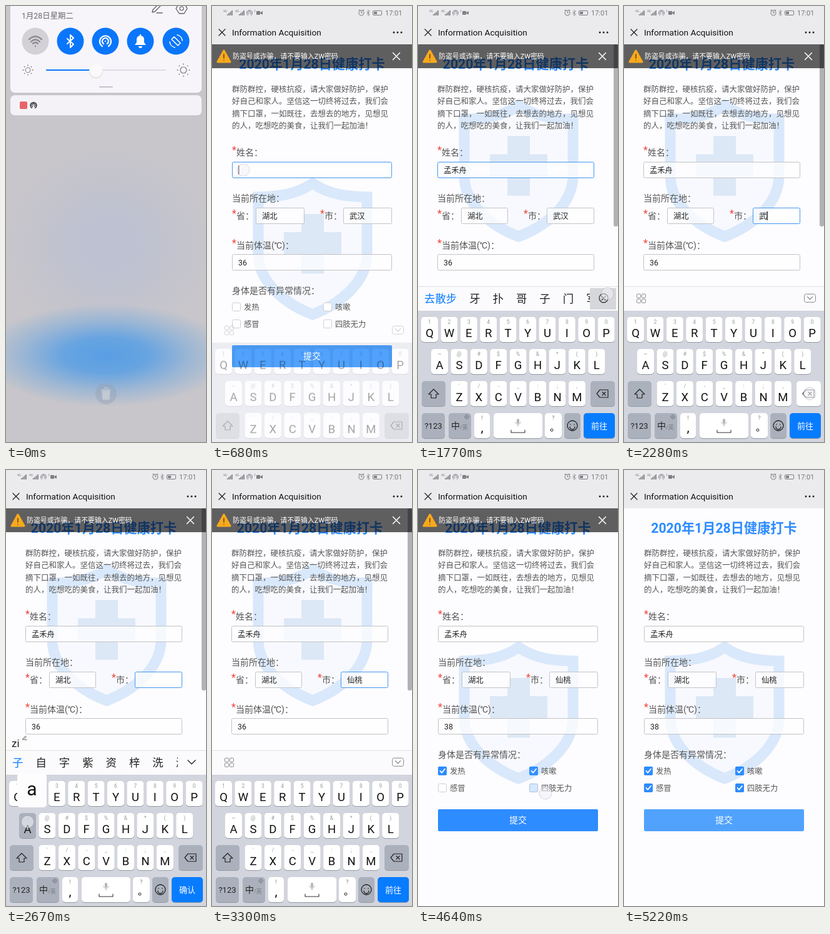
Write an HTML page with a canvas that moves like this. It is 320 px wide and 694 px high and loops after 5350 ms.

```html
<!DOCTYPE html>
<html lang="zh-CN">
<head>
<meta charset="utf-8">
<style>
html, body { margin: 0; width: 100%; height: 100%; overflow: hidden; background: #fdfcfe; }
canvas { display: block; width: 320px; height: 694px; }
</style>
</head>
<body>
<canvas id="stage" width="320" height="694"></canvas>
<script>
const stage = document.getElementById('stage').getContext('2d');
const layer = stage.canvas.cloneNode().getContext('2d');
let c = stage;
const LOOP = 5350, BLUE = '#2d8cff', KEYBLUE = '#087cff', TAU = Math.PI * 2;
const FONT = 'Roboto, "Noto Sans CJK SC", "Noto Sans CJK", sans-serif';
const NAME = '孟禾舟';

const ramp = (t, a, b) => Math.min(1, Math.max(0, (t - a) / (b - a)));
const ease = p => p * p * (3 - 2 * p);
const within = (t, a, b) => t >= a && t < b;

// y is the vertical middle of the text
function text(s, x, y, size, color = '#555', align = 'left', weight = 400) {
  c.font = `${weight} ${size}px ${FONT}`;
  c.textAlign = align;
  c.fillStyle = color;
  c.fillText(s, x, y + size * 0.37);
}
function widthOf(s, size) {
  c.font = `${size}px ${FONT}`;
  return c.measureText(s).width;
}
function box(x, y, w, h, r, fill, stroke) {
  c.beginPath();
  c.roundRect(x, y, w, h, r);
  if (fill) { c.fillStyle = fill; c.fill(); }
  if (stroke) { c.strokeStyle = stroke; c.lineWidth = 1; c.stroke(); }
}
function disc(x, y, r, fill) {
  c.beginPath();
  c.arc(x, y, r, 0, TAU);
  c.fillStyle = fill;
  c.fill();
}
function icon(d, x, y, color, width = 1.2, scale = 1) {
  c.save();
  c.translate(x, y);
  c.scale(scale, scale);
  c.lineCap = c.lineJoin = 'round';
  c.lineWidth = width;
  c.strokeStyle = c.fillStyle = color;
  const p = new Path2D(d);
  if (width) c.stroke(p); else c.fill(p);
  c.restore();
}
function faded(alpha, draw) {
  if (alpha <= 0) return;
  c.save();
  c.globalAlpha *= alpha;
  draw();
  c.restore();
}

const CROSS = 'M-5-5L5 5M5-5L-5 5';
const BT = 'M-5-4L5 5L0 10V-10L5-5L-5 4';
const HOTSPOT = 'M-5 8A9 9 0 1 1 5 8M-3 4A5 5 0 1 1 3 4M0 0V.1';
const PENCIL = 'M-7 5L-6 1L4-9L7-6L-3 4ZM0 6H9';
const RING = 'M-5 0A5 5 0 1 0 5 0A5 5 0 1 0-5 0';

/* ---------- page ---------- */
function statusBar() {
  const g = '#808085';
  box(0, 0, 320, 61, 0, '#ebeaed');
  for (const x of [18, 37]) {
    text('4G', x, 8, 5, g);
    for (let i = 0; i < 4; i++) box(x + 6 + i * 2.4, 13 - i * 2, 1.7, 2 + i * 2, 0, g);
  }
  icon(HOTSPOT, 60, 11, g, 2, 0.5);
  text('1', 67, 8, 6, g);
  box(71, 8, 6, 6, 1, g);
  icon('M5 0L10-3V3Z', 71, 11, g, 0);
  icon(RING + 'M0-3V0H2M-5-5L-3-6M5-5L3-6', 239, 11, g, 1.3, 0.8);
  icon(BT, 250, 11, g, 1.8, 0.45);
  box(257.5, 7.5, 14, 7, 1.5, null, g);
  box(259, 9, 5, 4, 0, g);
  text('17:01', 277, 11, 11, '#77777b');
  icon(CROSS, 16, 42, '#222', 1.3);
  text('Information Acquisition', 32, 42, 13.7, '#111');
  for (const x of [291, 297, 303]) disc(x, 42, 1.5, '#222');
}

function shield(dy) {
  c.save();
  c.translate(161, 386 + dy);
  c.lineJoin = 'miter';
  c.strokeStyle = '#d9e8fb';
  c.fillStyle = '#f8f9fe';
  c.lineWidth = 17;
  const rim = new Path2D('M0-104C-28-84-60-83-87-82V8C-87 56-40 90 0 105C40 90 87 56 87 8V-82C60-83 28-84 0-104Z');
  c.fill(rim);
  c.stroke(rim);
  c.fillStyle = '#dce8f6';
  c.fill(new Path2D('M-18-55H18V-26H46V10H18V40H-18V10H-46V-26H-18Z'));
  c.restore();
}

function field(x, y, w, value, focused, caret) {
  box(x + 0.5, y + 0.5, w - 1, 25, 2, 'rgba(255,255,255,.75)', focused ? '#4497ee' : '#c3c3c8');
  text(value, x + 10, y + 13, 12.3, '#222');
  if (focused && caret) box(x + 10 + widthOf(value, 12.3), y + 6, 1.5, 14, 0, '#222');
}
function required(label, x, y) {
  text('*', x, y - 4, 16, '#f0443c');
  text(label, x + 7, y, 14);
}
function check(label, x, y, amount) {
  box(x + 0.5, y - 6.5, 13, 13, 2, '#fff', '#cfcfd4');
  faded(amount, () => {
    box(x, y - 7, 14, 14, 2, BLUE);
    icon('M-3.5 0L-1 2.8L4-3', x + 7, y, '#fff', 1.8);
  });
  text(label, x + 19, y, 12.3);
}

const STORY = [
  '群防群控，硬核抗疫，请大家做好防护，保护',
  '好自己和家人。坚信这一切终将过去，我们会',
  '摘下口罩，一如既往，去想去的地方，见想见',
  '的人，吃想吃的美食，让我们一起加油！'
];
const CHECKS = [['发热', 32, 479, 4480], ['咳嗽', 178, 479, 4545], ['四肢无力', 178, 506, 4620], ['感冒', 32, 506, 4720]];

function page(t) {
  const small = within(t, 755, 4300);
  const x = small ? 31 : 32, w = small ? 251 : 256, mid = small ? 156.5 : 160;
  const caret = (t - 600) % 800 < 300;
  const focus = t < 630 ? '' : t < 2050 ? 'name' : t < 3400 ? 'city' : t < 4300 ? 'temp' : '';
  const city = t < 2210 ? '武汉' : t < 2300 ? '武' : t < 3190 ? '' : '仙桃';
  const temp = t < 3800 ? '36' : t < 4060 ? '3' : '38';

  box(0, 0, 320, 694, 0, '#fdfcfe');
  shield(small ? -124 : 0);
  text('2020年1月28日健康打卡', mid, 92, 21.2, BLUE, 'center', 700);
  STORY.forEach((s, i) => text(s, x, 132 + i * 19.6, 12.5));
  required('姓名：', x, 233);
  field(x, 248, w, t < 1620 ? '' : NAME, focus === 'name', caret);
  text('当前所在地：', x, 306, 14);
  required('省：', x, 334);
  field(x + 38, 321, small ? 75 : 78, '湖北');
  required('市：', small ? 169 : 173, 334);
  field(small ? 206 : 210, 321, small ? 76 : 78, city, focus === 'city', caret);
  required('当前体温(℃)：', x, 381);
  field(x, 395, w, temp, focus === 'temp', caret);
  if (within(t, 3450, 3800)) {
    disc(55, 429, 8.5, '#3e94ee');
    icon('M0-13L8-3H-8Z', 55, 429, '#3e94ee', 0);
  }
  text('身体是否有异常情况：', x, 453, 14);
  for (const [label, cx, cy, at] of CHECKS) check(label, cx, cy, ramp(t, at, at + 100));
  box(32, 540, 256, 35, 2, t > 4860 || t < 760 ? '#50a2fc' : BLUE);
  text('提交', 160, 557, 14, '#fff', 'center');
  if (small) box(313, 61, 7, 290, 3, '#b2b1b5');
  statusBar();
  faded(ramp(t, 615, 665) * (1 - ramp(t, 4870, 4950)), warning);
}

function warning() {
  box(0, 61, 320, 38, 0, 'rgba(0,0,0,.62)');
  icon('M0-9L10 9H-10Z', 19, 80, '#f9a91c', 3);
  icon('M0-9L10 9H-10Z', 19, 80, '#f9a91c', 0);
  icon('M0-3V3M0 6.5V6.6', 19, 80, '#5c4a22', 1.6);
  text('防盗号或诈骗，请不要输入ZW密码', 33, 80, 10.9, '#fff');
  icon(CROSS, 295, 80, '#fff', 1.3, 1.1);
}

/* ---------- keyboard ---------- */
const ROWS = [['QWERTYUIOP', '1234567890', 18.5, 495], ['ASDFGHJKL', '~@#$%&*()', 34.5, 546], ['ZXCVBNM', "'/-_:;,", 66, 597]];
const keys = {};
for (const [letters, hints, x, y] of ROWS)
  [...letters].forEach((k, i) => keys[k] = { x: x + i * 31.4, y, hint: hints[i] });

// each press: time, key label
const spell = (word, at, step) => [...word].map((ch, i) => [at + i * step, ch]);
const WORDS = [
  { keys: spell('menghezhou', 800, 74), end: 1620, result: NAME, first: '没吗们买每妈秘美' },
  { keys: spell('zi', 2440, 105).concat(spell('antao', 2645, 92)), end: 3190, result: '仙桃', first: '子自字紫资梓洗滋' }
];
const PRESSES = [...WORDS[0].keys, ...WORDS[1].keys, [4030, 'i']];
const TAPS = [
  [635, 50, 261], [1600, 30, 465], [1735, 303, 458], [2030, 240, 334], [2180, 297, 617], [2270, 297, 617],
  [3165, 28, 465], [3390, 60, 409], [3700, 297, 617], [4230, 297, 465],
  [4470, 40, 479], [4535, 186, 479], [4610, 204, 514], [4710, 40, 506], [4830, 165, 557]
];
for (const [at, k] of PRESSES) {
  const key = keys[k.toUpperCase()];
  TAPS.push([at, key.x, key.y + 14]);
}
const activeWord = t => WORDS.find(w => within(t, w.keys[0][0] + 40, w.end));

function cap(x, y, w, fill = '#fff') {
  box(x, y + 1, w, 40, 5, '#969aa4');
  box(x, y, w, 40, 5, fill);
}

function toolbar() {
  const g = '#8c8c92';
  for (const x of [20, 28])
    for (const y of [458, 466]) box(x + 0.5, y + 0.5, 6, 6, 1, null, g);
  box(288.5, 458.5, 18, 13, 3, null, g);
  icon('M-4-2L0 2L4-2', 297.5, 465, g);
}

function candidates(t) {
  const word = activeWord(t), size = 17.4;
  let list;
  if (word) {
    const typed = word.keys.filter(k => t >= k[0] + 40).map(k => k[1]).join('');
    const w = widthOf(typed, 17);
    list = [...word.first];
    if (typed.length === word.keys.length) list[0] = word.result;
    box(0, 424, w + 26, 22, 0, '#fcfcfd');
    text(typed, 9, 435, 17, '#222');
    icon(PENCIL, w + 17, 427, '#333', 2, 0.4);
  } else if (within(t, 1620, 1810)) {
    list = ['去散步', ...'牙扑哥子门军'];
  } else if (within(t, 3500, 3960)) {
    list = ['0晴川影库', '0青禾助手', '0云帆清理'];
  } else {
    return toolbar();
  }
  c.save();
  c.beginPath();
  c.rect(0, 446, 275, 39);
  c.clip();
  let x = 10;
  list.forEach((s, i) => {
    text(s, x, 465.5, size, i ? '#222' : KEYBLUE);
    x += widthOf(s, size) + 20;
  });
  c.restore();
  if (word) return icon('M-6-3L0 3L6-3', 297, 465, '#222', 1.4);
  if (within(t, 1735, 1810)) box(275, 449, 42, 34, 0, '#d6d7db');
  icon(RING, 297, 465, '#333', 0.9, 1.4);
  icon(CROSS, 297, 465, '#333', 2, 0.6);
}

function keyboard(t) {
  const pressed = PRESSES.find(p => within(t, p[0], p[0] + 62));
  const hot = pressed && pressed[1].toUpperCase();
  const deleting = [2180, 2270, 3700].some(a => within(t, a, a + 85));
  const gray = '#abb1bc';
  box(0, 485, 320, 289, 0, '#d2d5dd');
  if (within(t, 755, 4280)) {
    box(0, 446, 320, 39, 0, '#fbfbfd');
    box(0, 446, 320, 0.7, 0, '#d8d8dc');
  }
  candidates(t);
  for (const k in keys) {
    const { x, y, hint } = keys[k];
    cap(x - 13.5, y, 27, k === hot ? gray : '#fff');
    text(hint, x, y + 8, 8.5, '#999ba2', 'center');
    text(k, x, y + 25, 18.5, '#111', 'center');
  }
  cap(6, 597, 38, gray);
  icon('M0-7L8 1H4V7H-4V1H-8Z', 25, 617, '#222', 1.2);
  cap(276, 597, 39, deleting ? '#fff' : gray);
  icon('M-9 0L-4-6H9V6H-4ZM0-2.5L5 2.5M5-2.5L0 2.5', 295, 617, '#222', 1.2);
  cap(6, 648, 37, gray);
  text('?123', 24.5, 668, 13, '#222', 'center');
  cap(49, 648, 36, gray);
  text('中', 53, 668, 14, '#222');
  text('/英', 67, 671, 9, '#777b84');
  icon(RING + 'M-5 0H5M0-5V5', 78, 654, '#777b84', 1.2, 0.65);
  cap(90, 648, 25);
  text('!', 102.5, 656, 9, '#888', 'center');
  text(',', 102.5, 670, 21, '#111', 'center');
  cap(121, 648, 78);
  box(158, 657, 4, 8, 2, '#b5b5ba');
  icon('M-4-1A4 4 0 0 0 4-1M0 3V6', 160, 663, '#b5b5ba', 1);
  icon('M-11-2V2H11V-2', 160, 677, '#333', 1.1);
  cap(203, 648, 27);
  text('?', 216.5, 656, 9, '#888', 'center');
  icon(RING, 214, 675, '#111', 2.2, 0.4);
  cap(234, 648, 26, gray);
  icon(RING, 247, 668, '#222', 0.8, 1.6);
  icon('M-4 2A4 4 0 0 0 4 2M-3-2V-1.8M3-2V-1.8', 247, 668, '#222', 1.4);
  cap(265, 648, 50, KEYBLUE);
  text(activeWord(t) ? '确认' : '前往', 290, 668, 13, '#fff', 'center');
  if (hot) {
    const key = keys[hot], x = Math.min(279, Math.max(41.5, key.x));
    box(x - 23.5, key.y - 63, 47, 54, 5, '#fdfdfe');
    text(t > 4000 ? '8' : pressed[1], x, key.y - 39, 30, '#111', 'center');
  }
}

// while sliding, the keyboard is see-through and darkens the page below
function slideKeyboard(t) {
  const up = ramp(t, 640, 750) * (1 - ramp(t, 4280, 4410));
  if (!up) return;
  c = layer;
  c.clearRect(0, 0, 320, 694);
  keyboard(t);
  c = stage;
  c.save();
  c.globalAlpha = up;
  if (up < 1) c.globalCompositeOperation = 'multiply';
  c.drawImage(layer.canvas, 0, (1 - up) * 81);
  c.restore();
}

/* ---------- notification shade ---------- */
function glow(x, y, rx, ry, rgb, alpha) {
  c.save();
  c.translate(x, y);
  c.scale(rx, ry);
  const g = c.createRadialGradient(0, 0, 0, 0, 0, 1);
  [alpha, alpha * 0.88, alpha * 0.4, 0].forEach((a, i) => g.addColorStop(i / 3, `rgba(${rgb},${a})`));
  c.fillStyle = g;
  c.fillRect(-1, -1, 2, 2);
  c.restore();
}
function sun(x, y, r) {
  icon(RING, x, y, '#77777c', 1.2, r / 5);
  for (let i = 0; i < 8; i++) disc(x + Math.cos(i * TAU / 8) * r * 1.9, y + Math.sin(i * TAU / 8) * r * 1.9, 0.9, '#77777c');
}
function panel() {
  box(7, -40, 306, 178, 7, '#f7f5fa');
  text('1月28日星期二', 25, 15, 12.4, '#66656b');
  icon(PENCIL, 241, 5, '#66656b', 1.4);
  icon('M-4-8H4L9 0L4 8H-4L-9 0Z', 281, 4, '#66656b', 1.4);
  icon(RING, 281, 4, '#66656b', 2, 0.6);
  [47, 103, 159, 215, 272].forEach((x, i) => disc(x, 56, 21.5, i ? '#0a76fa' : '#d3d1d6'));
  icon('M-10-3Q0-12 10-3M-7 1Q0-6 7 1M-4 4Q0 0 4 4M0 8V8.1', 47, 56, '#8d8c92', 2.4);
  icon(BT, 103, 56, '#fff', 2);
  icon(HOTSPOT, 159, 56, '#fff', 2.2);
  icon('M-9 6L-6 2V-3A6 6 0 0 1 6-3V2L9 6ZM-3 8H3A3 3 0 0 1-3 8ZM-1-11H1V-8H-1Z', 215, 56, '#fff', 0);
  icon('M-7-3L-3-7L7 3L3 7ZM2-10A10 10 0 0 1 10-1M-2 10A10 10 0 0 1-10 1', 272, 56, '#fff', 1.6);
  sun(35, 102, 4);
  sun(284, 102, 5);
  box(64, 101, 192, 2, 1, '#dedce2');
  box(64, 101, 80, 2, 1, '#0a76fa');
  disc(144, 104, 11, '#dddbe0');
  disc(144, 103, 10.5, '#fafafa');
  box(149, 128, 22, 1.5, 1, '#b6b4ba');
  box(7, 142, 306, 32, 7, '#f4f2f6');
  box(22, 152, 12, 12, 2, '#e8646a');
  icon(HOTSPOT, 44, 158, '#222', 2.4, 0.55);
}
function shade(t) {
  faded(1 - ease(ramp(t, 60, 430)), () => {
    box(0, 0, 320, 694, 0, '#c8c6ca');
    glow(165, 380, 170, 160, '180,188,215', 0.55);
    glow(160, 556, 200, 82, '70,152,232', 0.85);
    disc(160, 617, 17, 'rgba(150,160,180,.45)');
    icon('M-7-6H7M-3-9H3M-6-4L-5 9H5L6-4Z', 160, 617, '#c3c8d2', 1.5);
    icon('M-6-4L-5 9H5L6-4Z', 160, 617, '#c3c8d2', 0);
  });
  c.save();
  c.translate(0, -185 * ease(ramp(t, 10, 360)));
  panel();
  c.restore();
}

/* ---------- loop ---------- */
function draw(t) {
  page(t);
  slideKeyboard(t);
  for (const [at, x, y] of TAPS) {
    if (!within(t, at, at + 100)) continue;
    faded(1 - ramp(t, at + 30, at + 100) * 0.8, () => {
      disc(x, y, 10, 'rgba(240,240,246,.6)');
      icon(RING, x, y, 'rgba(125,125,140,.3)', 0.5, 2);
    });
  }
  if (t < 450) shade(t);
}

const start = performance.now();
function tick() {
  draw((performance.now() - start) % LOOP);
  requestAnimationFrame(tick);
}
tick();
</script>
</body>
</html>
```
